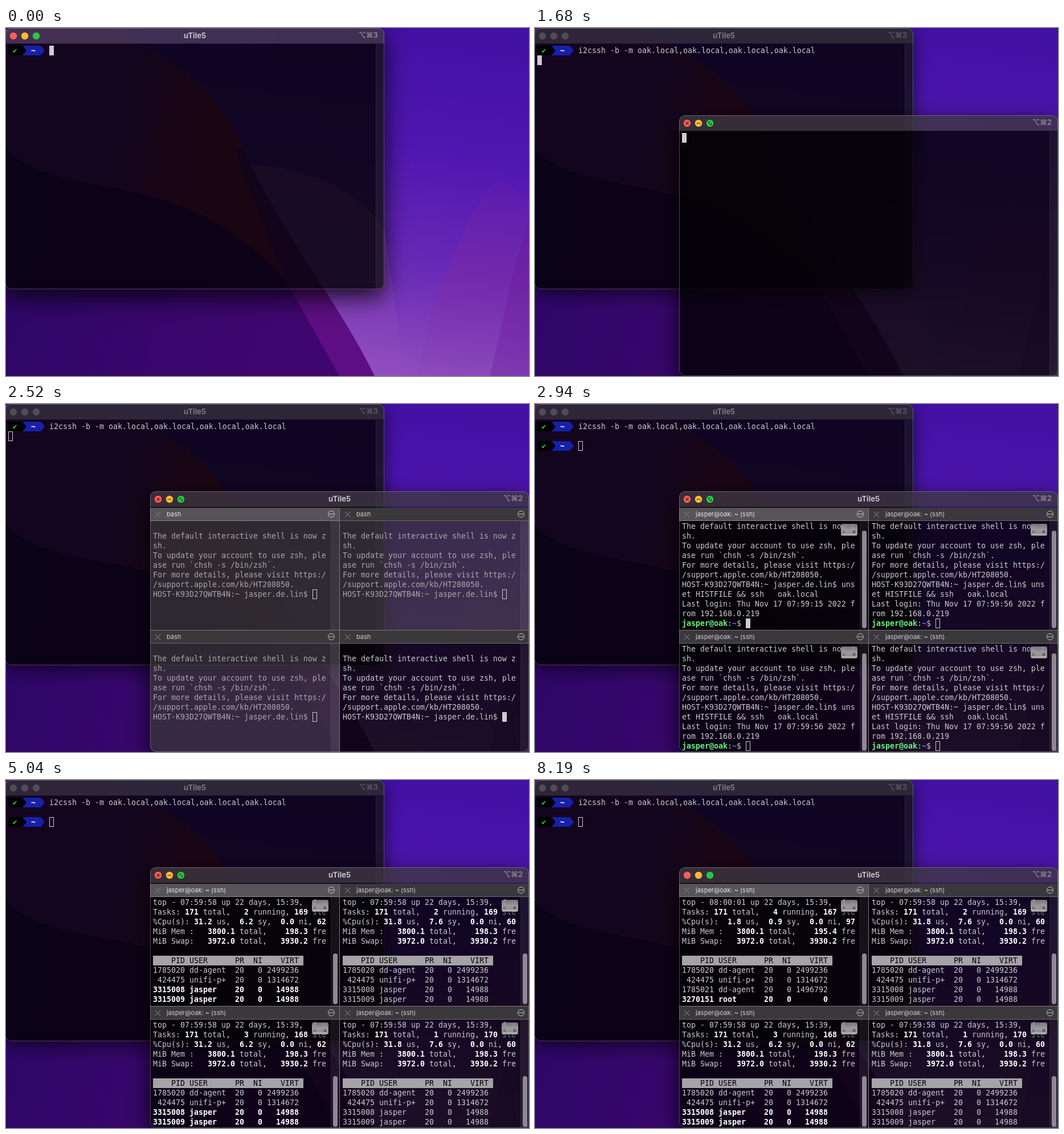
An HTML page with a canvas that plays this animation: 918x610 px, repeating every 8260 ms.

```html
<!DOCTYPE html>
<html lang="en">
<head>
<meta charset="utf-8">
<title>Split terminals</title>
<style>
html, body { margin: 0; width: 100%; height: 100%; overflow: hidden; background: #38066e; }
canvas { display: block; }
</style>
</head>
<body>
<canvas id="stage" width="918" height="610"></canvas>
<script>
const g = document.getElementById('stage').getContext('2d');
const LOOP = 8260, CELL = 8, ROW = 17;
const MONO = '13.29px "DejaVu Sans Mono", monospace';
const UI = 'Inter, "DejaVu Sans", sans-serif';
const APP = 'uTile5', HOST = 'oak', USER = 'jasper';
const LIGHTS = ['#ff5f57', '#febc2e', '#28c840'];
const GLASS = 'rgba(3,2,5,.82)', DIM_GLASS = 'rgba(54,50,56,.8)';

const INTRO = `
The default interactive shell is now zsh.
To update your account to use zsh, please run \`chsh -s /bin/zsh\`.
For more details, please visit https://support.apple.com/kb/HT208050.
HOST-K93D27QWTB4N:~ ${USER}.de.lin$ `;

// Per pane: top-left, top-right, bottom-left, bottom-right
const PANES = [
  { start: 1750, cmd: 2590, login: 2800, clock: '15', run: 2, us: '31.2', sy: '6.2', id: 62, bold: true },
  { start: 2030, cmd: 2590, login: 2870, clock: '56', run: 2, us: '31.8', sy: '7.6', id: 60 },
  { start: 2240, cmd: 2660, login: 2870, clock: '56', run: 3, us: '31.2', sy: '6.2', id: 62, bold: true },
  { start: 2450, cmd: 2660, login: 2940, clock: '56', run: 1, us: '31.8', sy: '7.6', id: 60 }
];

function box(x, y, w, h, color) {
  g.fillStyle = color;
  g.fillRect(x, y, w, h);
}

function poly(color, ...p) {
  g.fillStyle = color;
  g.beginPath();
  for (let i = 0; i < p.length; i += 2) g.lineTo(p[i], p[i + 1]);
  g.fill();
}

function line(color, width, ...p) {
  g.strokeStyle = color;
  g.lineWidth = width;
  g.beginPath();
  for (let i = 0; i < p.length; i += 4) {
    g.moveTo(p[i], p[i + 1]);
    g.lineTo(p[i + 2], p[i + 3]);
  }
  g.stroke();
}

function dot(x, y, r, color) {
  g.fillStyle = color;
  g.beginPath();
  g.arc(x, y, r, 0, 7);
  g.fill();
}

function blend(x0, y0, x1, y1, ...colors) {
  const f = g.createLinearGradient(x0, y0, x1, y1);
  colors.forEach((c, i) => f.addColorStop(i / (colors.length - 1), c));
  return f;
}

function label(s, x, y, color, font, align = 'left') {
  g.font = font;
  g.fillStyle = color;
  g.textAlign = align;
  g.fillText(s, x, y);
}

// Style marks: * bold, { green, } blue, | plain
function mono(s, x, y, plain) {
  const styles = { '*': '#ffffff', '{': '#62f77e', '}': '#6b6fff' };
  let color = plain, bold = '';
  for (const part of s.split(/([*{}|])/)) {
    if (part === '|') { color = plain; bold = ''; }
    else if (styles[part]) { color = styles[part]; bold = 'bold '; }
    else {
      label(part, x, y + 13, color, bold + MONO);
      x += part.length * CELL;
    }
  }
}

function cursor(x, y, solid) {
  if (solid) return box(x, y, 8, ROW, '#cfcbd3');
  g.strokeStyle = '#cfcbd3';
  g.lineWidth = 1;
  g.strokeRect(x + .5, y + .5, 7, ROW - 1);
}

function wallpaper() {
  box(0, 0, 918, 610, blend(60, 60, 370, 130, '#641690', '#641690', '#84144c'));
  // Dark slope on the left
  g.fillStyle = blend(0, 458, 500, 560, '#2e0668', '#40066f');
  g.beginPath();
  g.moveTo(0, 212);
  g.bezierCurveTo(90, 310, 300, 230, 490, 440);
  g.lineTo(600, 610);
  g.lineTo(0, 610);
  g.fill();
  poly('#5c0e82', 400, 210, 490, 440, 585, 610, 680, 610, 570, 440, 440, 220);
  // Bright slope on the right
  g.fillStyle = blend(700, 0, 620, 610, '#4310a4', '#4f16b0', '#6829b6', '#9250be');
  g.beginPath();
  g.moveTo(180, 0);
  g.bezierCurveTo(350, 80, 380, 130, 430, 240);
  g.quadraticCurveTo(480, 340, 565, 468);
  g.quadraticCurveTo(615, 545, 647, 610);
  g.lineTo(918, 610);
  g.lineTo(918, 0);
  g.fill();
  g.fillStyle = blend(0, 240, 0, 610, 'rgba(160,80,170,.5)', 'rgba(150,80,190,.1)');
  g.beginPath();
  g.moveTo(430, 240);
  g.quadraticCurveTo(590, 250, 664, 350);
  g.lineTo(700, 610);
  g.lineTo(647, 610);
  g.quadraticCurveTo(615, 545, 565, 468);
  g.quadraticCurveTo(480, 340, 430, 240);
  g.fill();
  poly(blend(0, 265, 0, 610, 'rgba(125,35,160,.1)', 'rgba(125,40,160,.5)', 'rgba(130,60,175,.1)'),
    862, 263, 820, 320, 755, 470, 720, 610, 918, 610, 918, 300);
  poly('rgba(105,20,145,.3)', 918, 335, 890, 430, 850, 610, 918, 610);
}

// Shadow falls only outside the frame; content is clipped inside it
function frame(x, y, w, h, focused, paint) {
  const shape = new Path2D(), outside = new Path2D();
  shape.roundRect(x, y, w, h, 10);
  outside.rect(-10, 0, 928, 610);
  outside.addPath(shape);
  g.save();
  g.clip(outside, 'evenodd');
  g.shadowColor = focused ? 'rgba(0,0,0,.8)' : 'rgba(0,0,0,.6)';
  g.shadowBlur = focused ? 42 : 30;
  g.shadowOffsetY = focused ? 14 : 8;
  g.fillStyle = '#000';
  g.fill(shape);
  g.restore();
  g.save();
  g.clip(shape);
  box(x, y, w, 28, focused ? 'rgba(63,56,65,.8)' : 'rgba(44,40,52,.95)');
  box(x, y + 27, w, 1, 'rgba(0,0,0,.55)');
  paint();
  g.restore();
  g.strokeStyle = 'rgba(205,195,215,.34)';
  g.lineWidth = 1;
  g.beginPath();
  g.roundRect(x + .5, y + .5, w - 1, h - 1, 10);
  g.stroke();
}

function titleBar(x, y, w, focused, title, key) {
  for (let i = 0; i < 3; i++) dot(x + 14 + i * 20, y + 14, 6.2, focused ? LIGHTS[i] : '#504c55');
  label(title, x + w / 2, y + 18, focused ? '#c9c4cd' : '#7c7783', 'bold 13px ' + UI, 'center');
  label('⌥⌘' + key, x + w - 11, y + 17, focused ? '#8b8395' : '#5b5664', 'bold 13px ' + UI, 'right');
}

function gutter(x, y, h) {
  box(x, y, 15, h, 'rgba(255,255,255,.06)');
  box(x, y, 1, h, 'rgba(255,255,255,.06)');
}

function prompt(y) {
  poly('#1720aa', 28, y, 61, y, 68, y + 8.5, 61, y + 17, 28, y + 17);
  poly('#000', 4, y, 29, y, 36, y + 8.5, 29, y + 17, 4, y + 17);
  label('✔', 15.5, y + 13, '#2fe036', '11px "DejaVu Sans", sans-serif', 'center');
  label('~', 48, y + 13, '#fff', 'bold ' + MONO, 'center');
}

function backWindow(t) {
  const focused = t < 1680, done = t >= 2730;
  frame(-1, 0, 665, 458, focused, () => {
    box(-1, 28, 665, 430, GLASS);
    gutter(649, 28, 430);
    titleBar(-1, 0, 665, focused, APP, 3);
    prompt(31);
    const hosts = Array(4).fill(HOST + '.local').join();
    if (t >= 210) mono('i2cssh -b -m ' + hosts, 76, 31, '#cbc8ce');
    if (done) prompt(65);
    const [col, row] = t < 210 ? [9, 0] : t < 910 ? [61, 0] : done ? [9, 2] : [0, 1];
    cursor(4 + col * CELL, 31 + row * ROW, t < 1750);
  });
}

function shellLines(p, t, cols) {
  let s = t >= p.start ? INTRO : '';
  if (t >= p.cmd) s += `unset HISTFILE && ssh   ${HOST}.local\n`;
  if (t >= p.login) {
    s += `Last login: Thu Nov 17 07:59:${p.clock} 2022 from 192.168.0.219\n{${USER}@${HOST}|:}~|$ `;
  }
  if (t >= 3990) s += 'top'.slice(0, Math.floor((t - 3990) / 70) + 1);
  if (t >= 4900) s += '\n';
  const cut = new RegExp(`.{1,${cols}}`, 'g');
  return s.split('\n').flatMap(l => l.match(cut) || ['']);
}

function topLines(p, late) {
  const proc = (pid, user, virt, bold) => (bold ? '*' : '') + String(pid).padStart(7) + ' ' +
    user.padEnd(10) + '20   0 ' + String(virt).padStart(7);
  const q = late ? { run: 4, us: ' 1.8', sy: '0.9', id: 97 } : p;
  return [
    `top - ${late ? '08:00:01' : '07:59:58'} up 22 days, 15:39,  4 u`,
    `Tasks: *171| total,   *${q.run}| running, *${171 - q.run}| sle`,
    `%Cpu(s): *${q.us}| us,  *${q.sy}| sy,  *0.0| ni, *${q.id}`,
    `MiB Mem :   *3800.1| total,    *${late ? 195.4 : 198.3}| fre`,
    'MiB Swap:   *3972.0| total,   *3930.2| fre',
    '',
    '    PID USER      PR  NI    VIRT ',
    proc(1785020, 'dd-agent', 2499236),
    proc(424475, 'unifi-p+', 1314672),
    late ? proc(1785021, 'dd-agent', 1496792) : proc(3315008, USER, 14988, p.bold),
    late ? proc(3270151, 'root', 0, true) : proc(3315009, USER, 14988, p.bold)
  ];
}

function paneHeader(x, y, lit, title) {
  box(x, y, 332, 22, lit ? '#565458' : '#3a383b');
  box(x, y + 22, 332, 1, lit ? '#88858a' : '#6a676c');
  line(lit ? '#858287' : '#98959a', 1, x + 9, y + 7, x + 18, y + 16, x + 18, y + 7, x + 9, y + 16);
  label(title, x + 29, y + 15, lit ? '#e6e4e8' : '#d0ced2', '11px ' + UI);
  g.strokeStyle = '#c9c6cb';
  g.beginPath();
  g.arc(x + 318, y + 11, 5.5, 0, 7);
  g.stroke();
  for (const d of [-2.7, 0, 2.7]) dot(x + 318 + d, y + 11, .9, '#d6d3d8');
}

function castIcon(x, y) {
  g.save();
  g.globalAlpha = .8;
  g.shadowColor = '#000';
  g.shadowBlur = 6;
  g.shadowOffsetY = 3;
  g.fillStyle = blend(0, y, 0, y + 21, '#8d8b8f', '#c0bec2', '#b0aeb2');
  g.beginPath();
  g.roundRect(x, y, 29, 21, 3);
  g.fill();
  g.restore();
  line('#d5d3d7', 1, x + 2, y + 18.5, x + 27, y + 18.5);
  dot(x + 5, y + 14, 2, '#59575c');
  dot(x + 5, y + 14, .8, '#c4c2c6');
  line('#4c4a4f', 1.5, x + 21, y + 12, x + 25, y + 16, x + 25, y + 12, x + 21, y + 16);
}

function terminal(lines, x, y, color, solid, showCursor) {
  lines.forEach((s, i) => {
    const inverse = s.startsWith('    PID');
    if (inverse) box(x, y + i * ROW, 264, ROW, '#a5a2a8');
    mono(s, x, y + i * ROW, inverse ? '#000' : color);
  });
  if (!showCursor) return;
  const last = lines[lines.length - 1].replace(/[*{}|]/g, '');
  cursor(x + last.length * CELL, y + (lines.length - 1) * ROW, solid);
}

function pane(i, t, active, lit, full) {
  const p = PANES[i], x = 253 + i % 2 * 333, y = i > 1 ? 397 : 182;
  const h = full ? 405 : 191, cast = t >= 2590, dim = !cast && !active, top = t >= 5040;
  const body = y + 23;
  box(x, body, 332, h, dim ? DIM_GLASS : GLASS);
  gutter(x + 317, body, h);
  const title = t >= p.login ? `${USER}@${HOST}: ~ (ssh)` : t >= p.start + 70 ? 'bash' : '';
  paneHeader(x, y, lit, title);
  const all = top ? topLines(p, i === 0 && t >= 8190) : shellLines(p, t, 38);
  terminal(all.slice(full ? 0 : -11), x + 5, body + 1, dim ? '#a9a6ab' : '#cbc8ce', active, !top);
  if (cast) castIcon(x + 284, body + 5);
  if (top || all.length > 11 && !full) {
    const from = top ? 99 : 17 + (all.length - 12) * 13;
    g.fillStyle = '#8d8894';
    g.beginPath();
    g.roundRect(x + 321, body + from, 8, 188 - from, 4);
    g.fill();
  }
}

function hoverGlyphs() {
  line('#7c0d0a', 1.3, 264.5, 164.5, 269.5, 169.5, 269.5, 164.5, 264.5, 169.5);
  line('#8a5300', 1.5, 283.5, 167, 290.5, 167);
  poly('#08560f', 304, 164, 308, 164, 304, 168);
  poly('#08560f', 310, 170, 306, 170, 310, 166);
}

function frontWindow(t) {
  frame(253, 153, 665, 457, true, () => {
    titleBar(253, 153, 665, true, t < 1750 ? '' : APP, 2);
    if (t < 7350) hoverGlyphs();
    if (t < 1960) {
      box(253, 181, 665, 429, GLASS);
      gutter(903, 181, 429);
      terminal(shellLines(PANES[0], t, 80), 258, 184, '#cbc8ce', true, true);
      return;
    }
    const count = t < 2170 ? 2 : t < 2380 ? 3 : 4;
    const active = t < 2380 ? 1 : t < 2590 ? 3 : 0;
    const lit = t >= 2520 ? 0 : active;
    for (let i = 0; i < count; i++) pane(i, t, i === active, i === lit, i + 2 >= count && i < 2);
    box(585, 182, 1, 428, '#79767c');
    if (count > 2) box(253, 396, count > 3 ? 665 : 332, 1, '#79767c');
  });
}

function draw(now) {
  const t = now % LOOP;
  wallpaper();
  backWindow(t);
  if (t >= 1680) frontWindow(t);
}

let begin;
function tick(now) {
  begin ??= now;
  draw(now - begin);
  requestAnimationFrame(tick);
}
requestAnimationFrame(tick);
</script>
</body>
</html>
```
